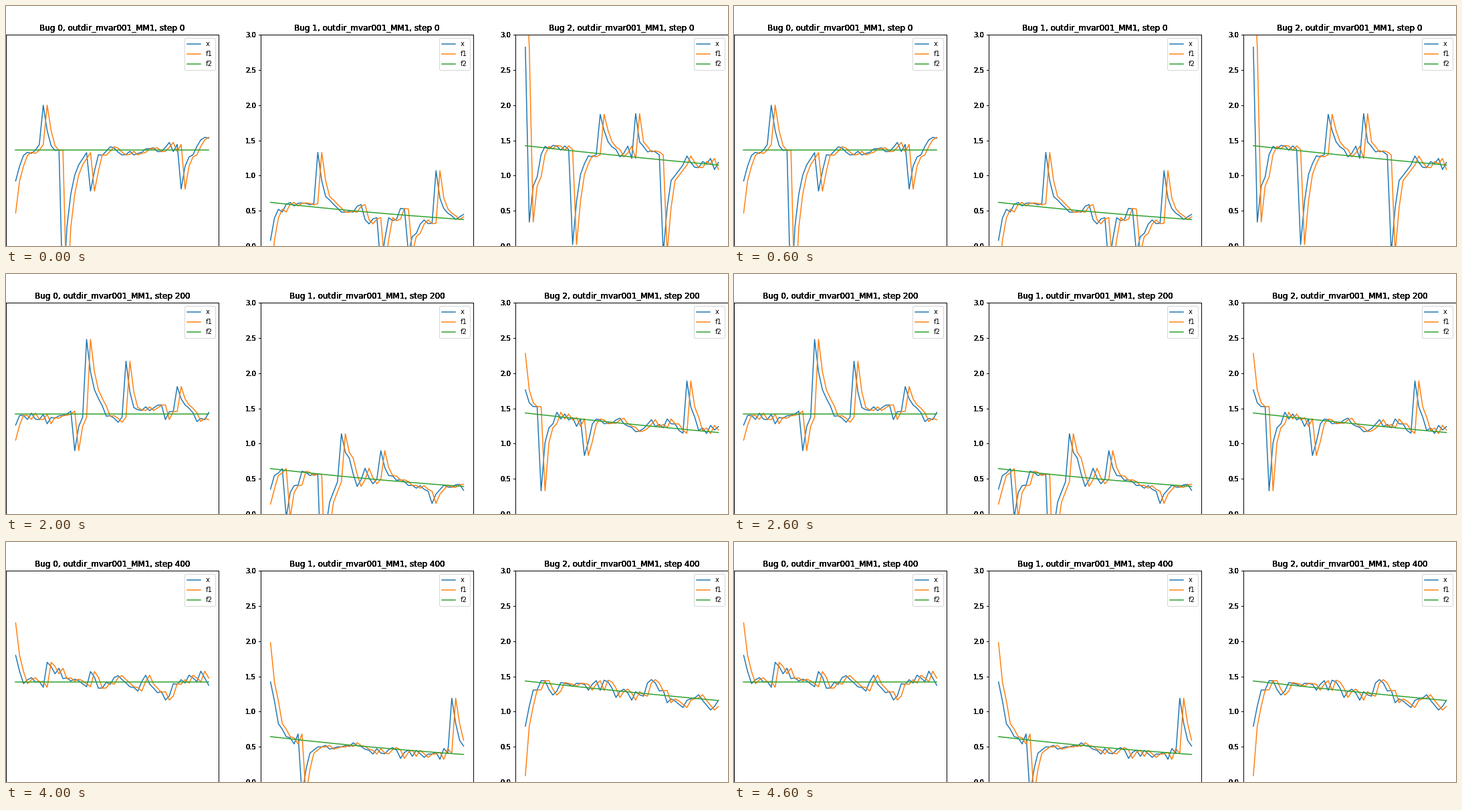
A matplotlib script that plays this animation: 1080 by 360 pixels, repeating every 5000 ms.

```python
import matplotlib.pyplot as plt
import numpy as np
from matplotlib.animation import FuncAnimation

W, H, DPI = 1080, 360, 72
N = 50               # samples per trace
UNIT = 105.6         # pixels per data unit
PITCH, WIDTH = 381.2, 317.7
LOW, HIGH = -0.5, 3.0
LAYERS = 7           # stacked axes, which thicken the text


def decay(start, rate):
    return start * np.exp(-rate * np.linspace(0, 1, N))


def relax(start, kicks, mean, rng):
    """Value before the window, then N samples drawn halfway back to the
    mean each time, unless a kick sets them."""
    out = [start]
    for i in range(N):
        value = (out[-1] + mean[i]) / 2 + rng.normal(0, .06)
        out.append(kicks.get(i, value))
    return np.array(out)


class Panel:
    """One bug: its trend and, per step, a start value and a few kicks."""

    def __init__(self, num, level, first, rate, runs):
        self.num = num
        rng = np.random.default_rng(num)
        self.trends = [decay(level if step else first, rate)
                       for step in range(len(runs))]
        self.traces = [relax(start, kicks, mean, rng)
                       for (start, kicks), mean in zip(runs, self.trends)]
        box = [num * PITCH / W, LOW * UNIT / H,
               WIDTH / W, (HIGH - LOW) * UNIT / H]
        self.layers = [self.add_layer(box, n) for n in range(LAYERS)]
        top = self.layers[-1]
        self.lines = [top.plot(np.zeros(N), label=name)[0]
                      for name in ("x", "f1", "f2")]
        top.set_ylim(LOW, HIGH)
        top.legend(loc="upper right")

    def add_layer(self, box, n):
        ax = fig.add_axes(box, label=f"{self.num}-{n}", facecolor="none")
        ax.set_ylim(LOW, HIGH)
        ax.set_xticks([])
        ax.set_yticks(np.linspace(0, HIGH, 7))
        return ax

    def show(self, step):
        trace = self.traces[step]
        curves = trace[1:], trace[:-1], self.trends[step]
        for line, ys in zip(self.lines, curves):
            line.set_ydata(ys)
        for ax in self.layers:
            ax.set_title(f"Bug {self.num}, outdir_mvar001_MM1, "
                         f"step {100 * step}")


plt.rcParams.update({"font.family": "DejaVu Sans", "font.size": 10})
fig = plt.figure(figsize=(W / DPI, H / DPI), dpi=DPI, facecolor="white")

panels = [
    Panel(0, 1.417, 1.363, 0, [
        (.47, {7: 2.0, 12: -.8, 19: .78, 42: .81}),
        (1.32, {6: .73, 18: 2.01, 29: 2.08, 31: -.05, 45: 1.86}),
        (1.05, {15: .9, 18: 2.48, 28: 2.17, 41: 1.81}),
        (.37, {0: .49, 9: 2.86, 19: .83, 35: .83}),
        (2.26, {8: 1.7}),
    ]),
    Panel(1, .645, .62, .5, [
        (-.5, {12: 1.33, 28: -.3, 35: -.1, 42: 1.07}),
        (.84, {6: 1.18, 29: 1.31, 45: .81}),
        (.14, {4: -.05, 13: -1, 18: 1.14, 28: .9, 41: .15}),
        (.92, {6: 2.26, 13: 1.39, 19: -1.5, 35: -.6}),
        (1.98, {8: -.2, 46: 1.19}),
    ]),
    Panel(2, 1.435, 1.425, .215, [
        (4.2, {1: .34, 12: .02, 19: 1.87, 28: 1.88, 35: -.1}),
        (1.29, {6: .25, 11: 1.78, 18: .38, 45: 1.79}),
        (2.28, {4: .33, 15: .83, 41: 1.89}),
        (.46, {0: .46, 5: 2.52, 13: 1.71}),
        (.09, {}),
    ]),
]


def draw(step):
    for panel in panels:
        panel.show(step)
    return []


anim = FuncAnimation(fig, draw, frames=5, interval=1000,
                     init_func=lambda: draw(0), repeat=True, repeat_delay=0)
plt.show()
```
